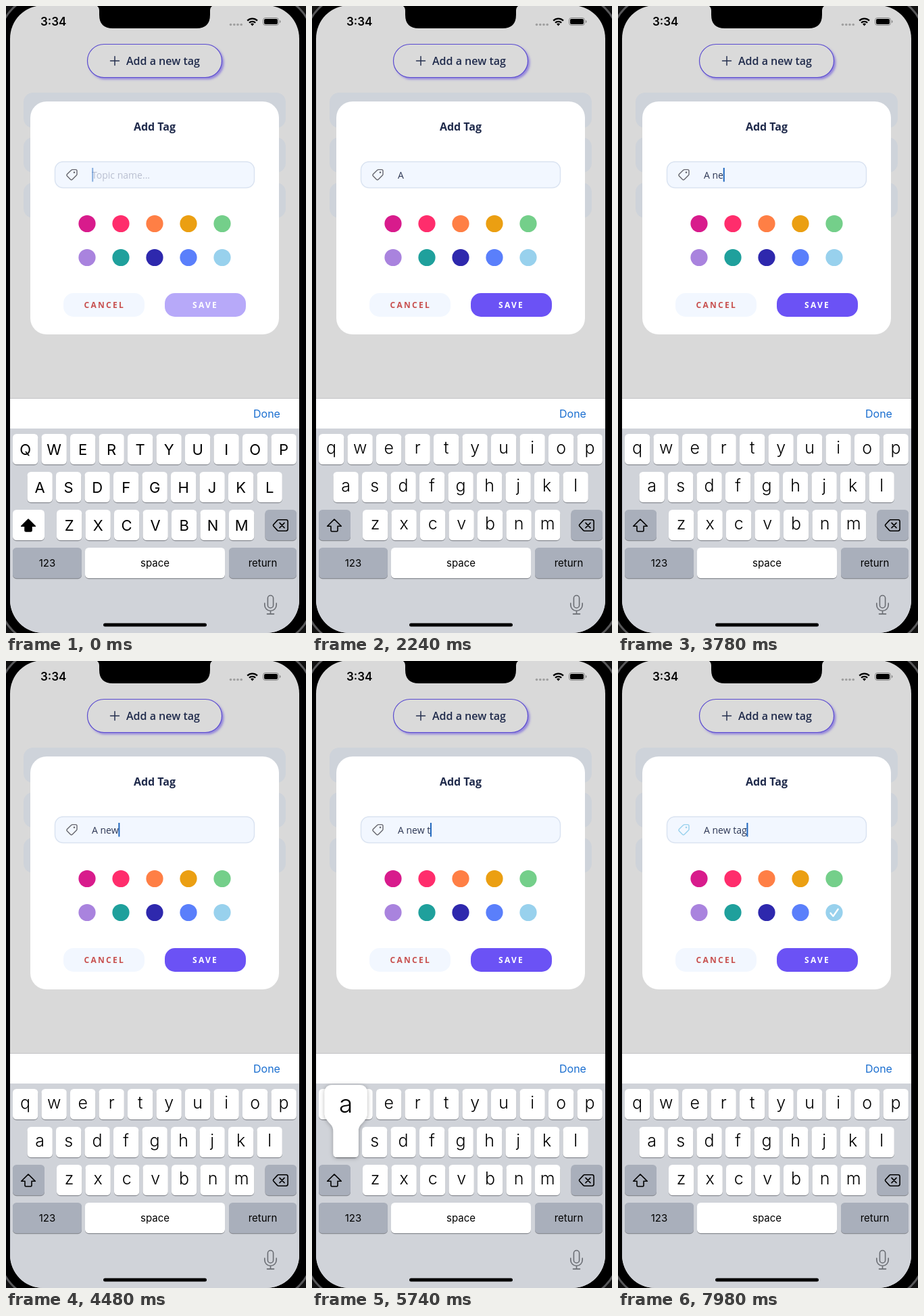
Recreate the animation shown at these times as an HTML page. Size 444x926 px, loop 8 s.

```html
<!DOCTYPE html>
<html lang="en">
<head>
<meta charset="utf-8">
<title>Add tag</title>
<style>
  html, body { margin: 0; width: 100%; height: 100%; overflow: hidden; background: #000; }
  svg { display: block; width: 100vw; height: 100vh; }
  text { font-family: "Open Sans", sans-serif; }
  .sys { font-family: Inter, Roboto, sans-serif; }
  .mid { text-anchor: middle; }
  .line { fill: none; stroke-linecap: round; stroke-linejoin: round; }
</style>
</head>
<body>
<svg viewBox="0 0 444 926">
  <defs>
    <clipPath id="screen"><rect x="6" y="-1" width="428" height="927" rx="49"/></clipPath>
    <filter id="glow" x="-20%" y="-40%" width="140%" height="190%">
      <feDropShadow dx="2.5" dy="2.5" stdDeviation="1.5" flood-color="#5b45dc" flood-opacity=".55"/>
    </filter>
    <filter id="lift" x="-30%" y="-30%" width="160%" height="160%">
      <feDropShadow dx="0" dy="1" stdDeviation="3" flood-color="#000" flood-opacity=".3"/>
    </filter>
  </defs>
  <rect width="444" height="926" fill="#111"/>
  <rect x="-9" y="-15" width="462" height="956" rx="64" fill="#000" stroke="#58585a" stroke-width="3"/>

  <g clip-path="url(#screen)">
    <rect width="444" height="926" fill="#d9d9d9"/>
    <g fill="#ced3da">
      <rect x="26" y="128" width="388" height="52" rx="14"/>
      <rect x="26" y="194" width="388" height="52" rx="14"/>
      <rect x="26" y="261" width="388" height="52" rx="14"/>
    </g>

    <!-- status bar -->
    <path d="M132 -1q6 1 6 8v6q0 20 20 20h124q20 0 20-20v-6q0-7 6-8z" fill="#000"/>
    <text class="sys" x="51" y="29" font-size="17" font-weight="600">3:34</text>
    <g fill="#a0a0a0">
      <circle cx="332.5" cy="27.5" r="1.8"/><circle cx="337.8" cy="27.5" r="1.8"/>
      <circle cx="343" cy="27.5" r="1.8"/><circle cx="348.2" cy="27.5" r="1.8"/>
    </g>
    <g fill="none" stroke="#000" stroke-width="2.3">
      <path d="M357.2 21.6a10.5 10.5 0 0 1 14.8 0"/>
      <path d="M360 24.8a6.6 6.6 0 0 1 9.2 0"/>
    </g>
    <path d="M364.6 29.4l-2.6-2.8a4 4 0 0 1 5.2 0z"/>
    <rect x="380.5" y="17.5" width="23" height="11" rx="3.4" fill="none" stroke="#858585"/>
    <rect x="382" y="19" width="20" height="8" rx="2"/>
    <path d="M405 21q1.6.6 1.6 2t-1.6 2z" fill="#858585"/>

    <!-- button behind the dialog -->
    <rect x="120.5" y="56.5" width="199" height="49" rx="24.5" fill="#dadada" stroke="#5a4bd0" stroke-width="1.2" filter="url(#glow)"/>
    <path class="line" d="M154.5 81h13M161 74.5v13" stroke="#26304f" stroke-width="1.5"/>
    <text x="178" y="87" font-size="16" font-weight="600" fill="#1f2a4b">Add a new tag</text>

    <!-- dialog -->
    <rect x="36" y="141" width="368" height="344" rx="24" fill="#fff"/>
    <text class="mid" x="220" y="184" font-size="16" font-weight="700" fill="#1f2a4b">Add Tag</text>
    <rect x="72.5" y="230" width="295" height="38.5" rx="12" fill="#f2f7ff" stroke="#dae3f1" stroke-width="1.5"/>
    <g id="tag" class="line" stroke="#66666e" stroke-width="1.4">
      <path d="M98.4 241.6h4.6q2 0 2 2v4.8q0 .9-.7 1.6l-6 6q-1.5 1.3-3 0l-4.7-4.7q-1.3-1.5 0-3l6.2-6.1q.7-.6 1.6-.6z"/>
      <circle cx="101" cy="245.7" r=".6"/>
    </g>
    <text id="hint" x="127" y="255" font-size="14" fill="#b9bfd0">Topic name...</text>
    <text id="value" x="127" y="255" font-size="14" fill="#2b3553"></text>
    <rect id="caret" y="239" width="2" height="20.5" fill="#1f66bd"/>
    <g id="swatches"></g>
    <path id="check" class="line" d="M314.5 372.3l4 4.6 7.2-10.4" stroke="#fff" stroke-width="2.3"/>
    <rect x="85" y="424" width="120" height="35" rx="15" fill="#f2f7ff"/>
    <rect id="save" x="235" y="424" width="120" height="35" rx="15"/>
    <g font-size="12" font-weight="700" letter-spacing="2.3">
      <text x="115.5" y="446" fill="#c8504f">CANCEL</text>
      <text x="276" y="446" fill="#fff">SAVE</text>
    </g>

    <!-- keyboard -->
    <rect y="579" width="444" height="46" fill="#fff"/>
    <rect y="579" width="444" height="1" fill="#c4c4c6"/>
    <text class="sys" x="366" y="608" font-size="16" fill="#1b6fd0">Done</text>
    <rect y="624" width="444" height="302" fill="#d0d3d9"/>
    <g id="keys"></g>
    <path id="shift" d="M33 758l10.3 10.3h-5.3v6q0 1.7-1.7 1.7h-6.6q-1.7 0-1.7-1.7v-6h-5.3z" stroke="#000" stroke-width="1.6" stroke-linejoin="round"/>
    <g class="line" stroke="#000" stroke-width="1.6">
      <path d="M403.5 758.8h11q2.6 0 2.6 2.6v11.2q0 2.6-2.6 2.6h-11q-1.1 0-1.9-.8l-5.6-6.2q-1-1.2 0-2.4l5.6-6.2q.8-.8 1.9-.8z"/>
      <path d="M405 763.4l7 7.2M412 763.4l-7 7.2"/>
    </g>
    <g class="line" stroke="#6a6d73" stroke-width="1.6">
      <rect x="387.4" y="870.5" width="8.2" height="18.5" rx="4.1"/>
      <path d="M382.8 882v2.6a8.7 8.7 0 0 0 17.4 0v-2.6M391.5 893.3v4.4M386.5 897.9h10"/>
    </g>
    <g id="popup">
      <path fill="#fff" filter="url(#lift)"/>
      <text class="sys mid" font-size="37" font-weight="300"></text>
    </g>
    <rect x="144" y="911.5" width="153" height="5" rx="2.5"/>
  </g>
</svg>
<script>
const LOOP = 8000;
const GRAY = '#a9afbb';
const $ = id => document.getElementById(id);

// [start, text in the field]
const typed = [[0, ''], [1540, 'A'], [2450, 'A '], [3150, 'A n'], [3780, 'A ne'], [4200, 'A new'],
  [4690, 'A new '], [5180, 'A new t'], [5950, 'A new ta'], [6720, 'A new tag']];

// [start, key held down]
const held = [[0, ''], [1330, 'a'], [1540, ''], [2310, ' '], [2450, ''], [2940, 'n'], [3150, ''],
  [3570, 'e'], [3780, ''], [3990, 'w'], [4200, ''], [4550, ' '], [4690, ''], [4970, 't'], [5180, ''],
  [5740, 'a'], [5950, ''], [6510, 'g'], [6720, '']];

// [start, caret opacity]
const blink = [[0, .5], [70, 0], [420, .5], [490, 1], [980, .78], [1050, .35], [1120, 0], [1540, 1],
  [2170, .5], [2240, 0], [2450, 1], [3080, .5], [3150, 1], [5810, .5], [5880, 0], [5950, 1],
  [6580, .5], [6650, 0], [6720, 1], [7280, .7], [7350, .3], [7420, 0], [7630, .5], [7700, 1]];

const PICK_TIME = 7910;
const colors = ['#d81b8c', '#ff2d6c', '#ff7f45', '#eb9f12', '#74cf8a',
  '#a983de', '#1fa09c', '#2e28ad', '#5a7ffb', '#98d1ed'];

function add(parent, tag, attrs, content = '') {
  const el = document.createElementNS('http://www.w3.org/2000/svg', tag);
  for (const name in attrs) el.setAttribute(name, attrs[name]);
  el.textContent = content;
  return parent.appendChild(el);
}

function addKey(x, y, width, fill = '#fff', label = '') {
  const box = { x, width, height: 45, rx: 5.5 };
  add($('keys'), 'rect', { ...box, y: y + 1.2, fill: '#898c92' });
  const face = add($('keys'), 'rect', { ...box, y, fill });
  if (label) {
    add($('keys'), 'text', { class: 'sys mid', x: x + width / 2, y: y + 28, 'font-size': 15 }, label);
  }
  return face;
}

colors.forEach((fill, i) => add($('swatches'), 'circle',
  { cx: 120 + i % 5 * 50, cy: i < 5 ? 321.5 : 371.5, r: 12.6, fill }));

const letters = {};
[['qwertyuiop', 10, 632], ['asdfghjkl', 31.5, 688], ['zxcvbnm', 75, 744]].forEach(([row, left, y]) => {
  [...row].forEach((char, i) => {
    const x = left + i * 42.5;
    addKey(x, y, 37.3);
    const label = add($('keys'), 'text', { class: 'sys mid', x: x + 18.65 });
    letters[char] = { cx: x + 18.65, y, label };
  });
});
const shiftKey = addKey(10, 744, 47);
addKey(383.5, 744, 46.5, GRAY);
addKey(10, 800, 102, GRAY, '123');
const spaceKey = addKey(117, 800, 207, '#fff', 'space');
addKey(330, 800, 100, GRAY, 'return');

const [bubble, bubbleText] = $('popup').children;

function at(steps, time) {
  let value;
  for (const [start, v] of steps) if (start <= time) value = v;
  return value;
}

function setCase(upper) {
  for (const char in letters) {
    const { label, y } = letters[char];
    label.textContent = upper ? char.toUpperCase() : char;
    label.setAttribute('y', y + (upper ? 31 : 29));
    label.setAttribute('font-size', upper ? 22 : 25);
    label.setAttribute('font-weight', upper ? 400 : 300);
  }
  shiftKey.setAttribute('fill', upper ? '#fff' : GRAY);
  $('shift').setAttribute('fill', upper ? '#000' : 'none');
}

function setPopup(char, upper) {
  const key = letters[char];
  $('popup').style.display = key ? '' : 'none';
  if (!key) return;
  bubble.setAttribute('d', `M${key.cx - 31.5} ${key.y - 50}q0-12 12-12h39q12 0 12 12v30
    c0 13-12.8 14-12.8 26v33.5q0 5.5-5.5 5.5h-26.4q-5.5 0-5.5-5.5v-33.5c0-12-12.8-13-12.8-26z`);
  bubbleText.setAttribute('x', key.cx);
  bubbleText.setAttribute('y', key.y - 21);
  bubbleText.textContent = upper ? char.toUpperCase() : char;
}

let shown;
function render(time) {
  const text = at(typed, time), key = at(held, time), opacity = at(blink, time);
  const picked = time >= PICK_TIME;
  const state = [text, key, opacity, picked].join('|');
  if (state === shown) return;
  shown = state;

  const empty = text === '';
  $('value').textContent = text.replace(/ /g, '\u00a0');
  $('hint').style.display = empty ? '' : 'none';
  $('caret').setAttribute('x', 127.2 + (empty ? 0 : $('value').getComputedTextLength() - .4));
  $('caret').setAttribute('opacity', opacity);
  $('save').setAttribute('fill', empty ? '#b7a9f9' : '#6b52f5');
  $('tag').setAttribute('stroke', picked ? colors[9] : '#66666e');
  $('check').style.display = picked ? '' : 'none';
  spaceKey.setAttribute('fill', key === ' ' ? GRAY : '#fff');
  setCase(empty);
  setPopup(key, empty);
}

const start = performance.now();
function tick() {
  render((performance.now() - start) % LOOP);
  requestAnimationFrame(tick);
}
tick();
</script>
</body>
</html>
```
